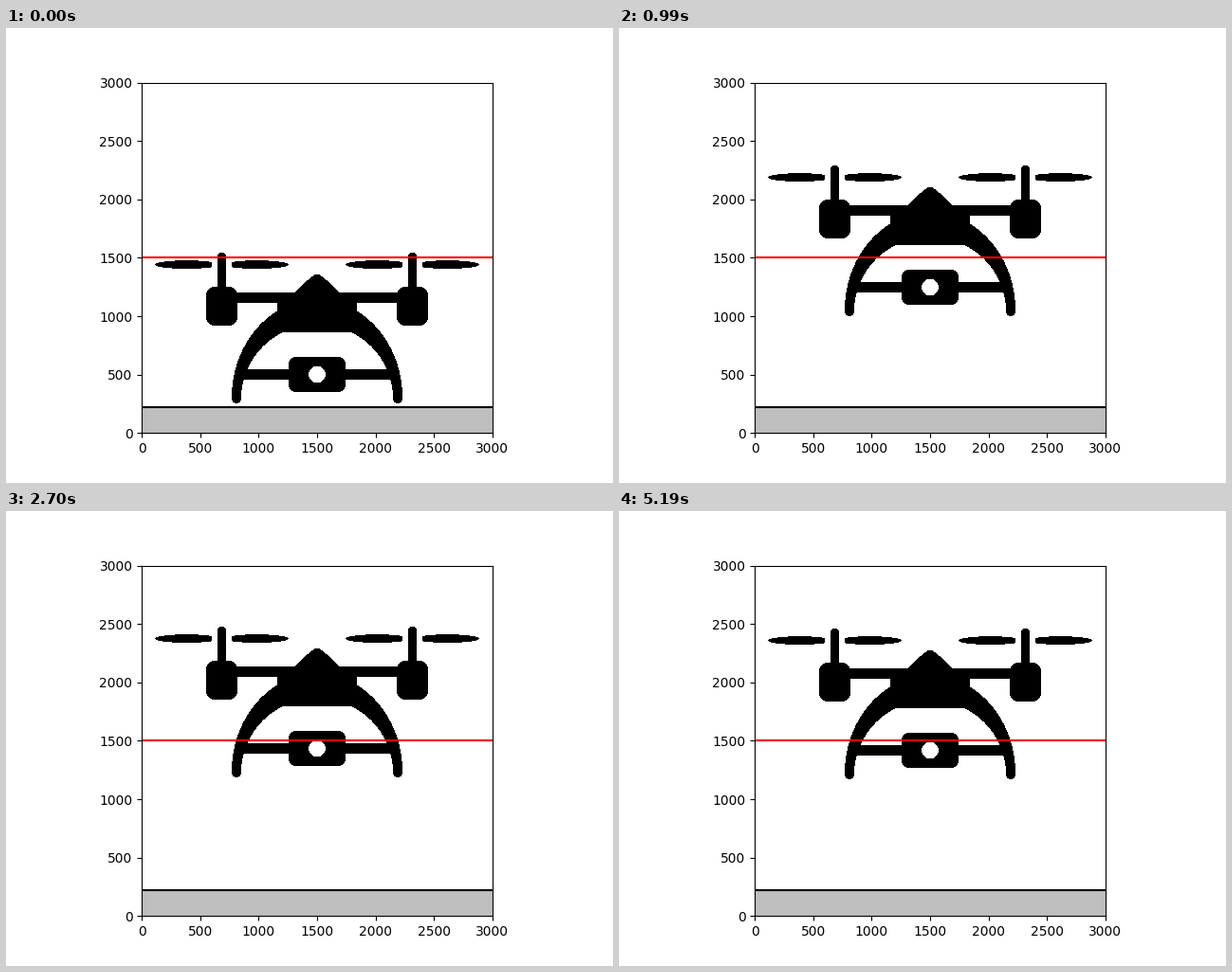
These frames come from a looping animation (640 by 480 pixels, 6 s). A matplotlib script:

```python
import math

import matplotlib.pyplot as plt
import numpy as np
from matplotlib.animation import FuncAnimation

FRAMES, STEP = 200, 30
UNIT = 3000 / 369.6          # data units per pixel
LEFT, BASE = 143.2, 427.2    # pixel position of the data origin
MID = 328                    # drone's axis of symmetry, in pixels
SPAN, TOP, BOTTOM = 174, 234, 399
FINE = 3                     # silhouette samples per pixel

# Damped step response of the altitude controller
HOVER, OVERSHOOT = 112.7, 51.8
PEAK, HALF = 508, 560
DECAY, OMEGA = 0.825 / HALF, math.pi / HALF


def climb(ms):
    """Height above the starting position, in pixels."""
    if ms == 0:
        return 0
    d = ms - PEAK
    swing = math.cos(OMEGA * d) + DECAY / OMEGA * math.sin(OMEGA * d)
    return HOVER + OVERSHOOT * math.exp(-DECAY * d) * swing


def oval(x, y, cx, cy, rx, ry):
    return ((x - cx) / rx) ** 2 + ((y - cy) / ry) ** 2 <= 1


def box(x, y, cx, half, y0, y1, r=0):
    """Rectangle around cx with corners of radius r."""
    dx = np.abs(x - cx) - half + r
    dy = np.abs(y - (y0 + y1) / 2) - (y1 - y0) / 2 + r
    return np.hypot(dx.clip(0), dy.clip(0)) + np.minimum(np.maximum(dx, dy), 0) <= r


def drone():
    """Silhouette as an RGBA image; x runs outwards from the middle."""
    x = np.abs((np.arange(2 * SPAN * FINE) + 0.5) / FINE - SPAN)[None, :]
    y = (TOP + (np.arange((BOTTOM - TOP) * FINE) + 0.5) / FINE)[:, None]
    rotor = 100.5

    reach = np.abs(x - rotor)
    blades = oval(reach, y, 37, 249.6, 33.5, 4.4) & (reach > 10.5)
    pins = box(x, y, rotor, 4.5, 237, 285, 4.5)
    motors = box(x, y, rotor, 16.5, 273, 314, 9.5)

    arms = box(x, y, 0, 90, 278.6, 289.9)
    nose = (y > 255.3 + 0.97 * np.hypot(x, 4.7)) & (y < 280)
    body = box(x, y, 0, 42, 280, 300) | box(x, y, 0, 36, 298, 321)
    arch = oval(x, y, 0, 390, 90, 103.4) & ~oval(x, y, 0, 391, 80, 78.4)
    legs = (arch & (y > 298) & (y < 391)) | oval(x, y, 85, 391, 5, 5)
    bar = box(x, y, 0, 78, 360.3, 371)
    camera = box(x, y, 0, 30, 347, 384, 7.5)

    solid = blades | pins | motors | arms | nose | body | legs | bar | camera
    solid &= ~oval(x, y, 0, 365.5, 8.8, 8.8)
    image = np.zeros(solid.shape + (4,), np.uint8)
    image[..., 3] = solid * 255
    return image


def extent(up):
    """Data limits of the silhouette when lifted by up pixels."""
    left, right = MID - SPAN - LEFT, MID + SPAN - LEFT
    low, high = BASE - BOTTOM + up, BASE - TOP + up
    return [v * UNIT for v in (left, right, low, high)]


fig, ax = plt.subplots(figsize=(6.4, 4.8), dpi=100)
ax.axhspan(0, 220, color="#bebebe", lw=0, zorder=0.5)
ax.axhline(220, color="black", lw=1.5, zorder=0.6)
ax.axhline(1500, color="red", lw=1.5, zorder=2)
craft = ax.imshow(drone(), extent=extent(0), interpolation="nearest", zorder=1)
ax.set_xlim(0, 3000)
ax.set_ylim(0, 3000)


def update(i):
    craft.set_extent(extent(climb(i * STEP)))
    return [craft]


anim = FuncAnimation(fig, update, frames=FRAMES, interval=STEP, repeat=True)
plt.show()
```
